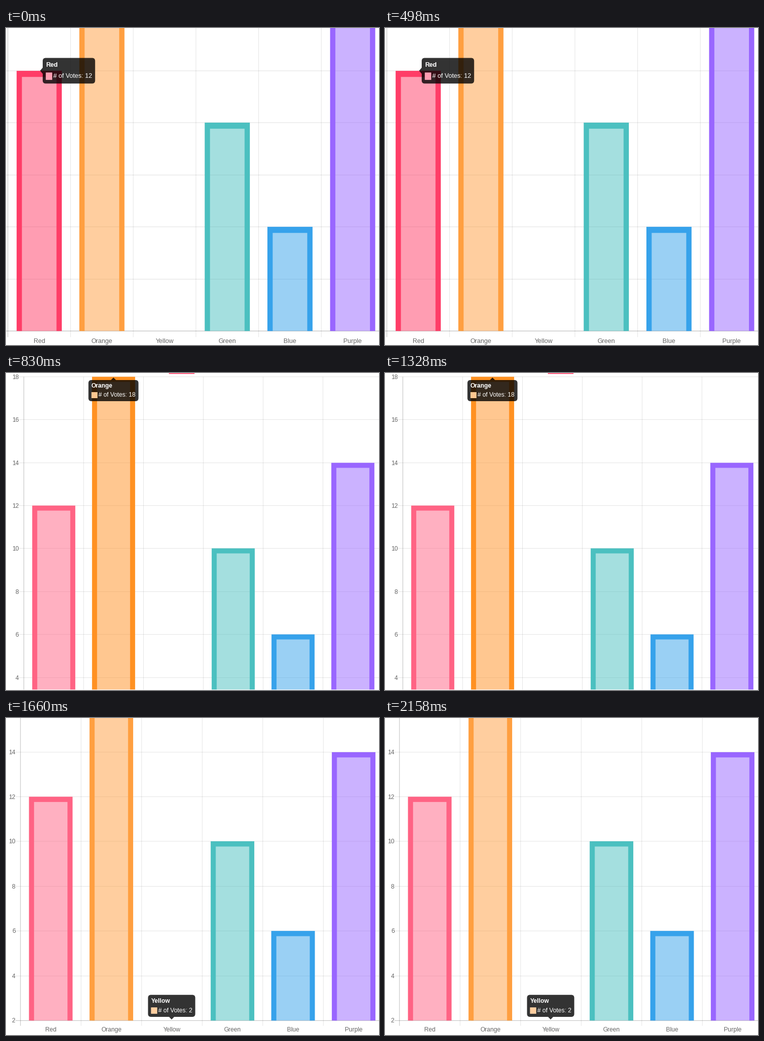
A matplotlib script for the animation above (2.49 s loop, 742 by 630 pixels).

```python
from collections import namedtuple

import matplotlib.pyplot as plt
from matplotlib.animation import FuncAnimation
from matplotlib.patches import FancyBboxPatch, Polygon, Rectangle

W, H, DPI = 742, 630, 100
PX = 72 / DPI
FONT = "Liberation Sans"
LOW, HIGH = 2, 18
COL, STEP = 119, 85.4  # column width and height of two votes, unzoomed

# name, votes, colour, hover colour
BARS = [
    ("Red", 12, "#ff6384", "#ff3d67"),
    ("Orange", 18, "#ff9f40", "#ff9122"),
    ("Yellow", 2, "#ffce56", "#ff9f40"),
    ("Green", 10, "#4bc0c0", "#4bc0c0"),
    ("Blue", 6, "#36a2eb", "#36a2eb"),
    ("Purple", 14, "#9966ff", "#9966ff"),
]

# left axis, y of the lowest value, zoom in x and y,
# lowest visible pixel, hovered bar, tooltip corner, tooltip caret side
View = namedtuple("View", "left base sx sy floor hover tip side")
VIEWS = [
    View(3.7, 602.2, 1.048, 1.211, H, 0, (73, 59.5), "left"),
    View(35.5, 690.5, 1, 1, 629, 1, (164, 14), "top"),
    View(28.8, 601.3, 1.0126, 1.0418, H, 2, (282.5, 550.2), "bottom"),
]

fig = plt.figure(figsize=(W / DPI, H / DPI), dpi=DPI, facecolor="white")
ax = fig.add_axes([0, 0, 1, 1])


def line(xs, ys, width, strong=False):
    ax.plot(xs, ys, color="black", alpha=0.25 if strong else 0.1,
            lw=width * PX, solid_capstyle="butt", snap=False, zorder=0)


def label(x, mid, s, size, color="#666666", ha="left", weight="normal"):
    """Text whose capitals are centred on the height mid."""
    ax.text(x, mid + 0.36 * size, s, fontsize=size * PX, family=FONT,
            color=color, ha=ha, va="baseline", weight=weight)


def fill(patch):
    patch.set(zorder=1, snap=False, linewidth=0)
    ax.add_patch(patch)


def value_y(v, votes):
    return v.base - round((votes - LOW) / 2 * STEP) * v.sy


def draw_grid(v):
    tick = v.left - 10 * v.sx
    size = 12 * v.sx
    for votes in range(LOW, HIGH + 1, 2):
        y = value_y(v, votes)
        if -10 < y < v.floor:
            line([tick, W], [y, y], v.sy, votes == LOW)
            label(tick, y - 0.3, str(votes), size, ha="right")
    end = min(v.base + 10 * v.sy, v.floor)
    for i, (name, *_) in enumerate(BARS):
        x = v.left + i * COL * v.sx
        line([x, x], [value_y(v, HIGH), end], v.sx, i == 0)
        if v.base < H:
            label(x + COL * v.sx / 2, v.base + 16.2 * v.sy, name, size,
                  ha="center")


def draw_bars(v):
    bx, by = 10 * v.sx, 10 * v.sy
    half = 0.36 * COL * v.sx
    bottom = min(v.base, v.floor)
    for i, (_, votes, color, hover) in enumerate(BARS):
        if votes == LOW:
            continue
        if i == v.hover:
            color = hover
        mid = v.left + (i + 0.5) * COL * v.sx
        l, r, t = mid - half, mid + half, value_y(v, votes)
        fill(Rectangle((l + bx / 2, t + by / 2), r - l - bx,
                       bottom - t - by / 2, fc=color, alpha=0.5))
        fill(Polygon([(l, bottom), (l, t), (r, t), (r, bottom),
                      (r - bx, bottom), (r - bx, t + by),
                      (l + bx, t + by), (l + bx, bottom)], fc=color))


def draw_tooltip(v):
    name, votes, _, color = BARS[v.hover]
    x, y = v.tip
    sx, sy = v.sx, v.sy
    w = (99.5 if votes > 9 else 92.8) * sx
    h = 42 * sy
    fill(FancyBboxPatch((x, y), w, h, fc="black", alpha=0.8,
                        boxstyle="round,pad=0,rounding_size=6"))
    cx, cy, dx, dy = x + w / 2, y + h / 2, 5 * sx, 5 * sy
    caret = {
        "left": [(x, cy - dy), (x - dx, cy), (x, cy + dy)],
        "top": [(cx - dx, y), (cx, y - dy), (cx + dx, y)],
        "bottom": [(cx - dx, y + h), (cx, y + h + dy), (cx + dx, y + h)],
    }[v.side]
    fill(Polygon(caret, fc="black", alpha=0.8))

    swatch = (x + 6 * sx, y + 24 * sy), 12 * sx, 12 * sy
    fill(Rectangle(*swatch, fc="white"))
    fill(Rectangle(*swatch, fc=color, alpha=0.5))
    size = 12 * sx
    label(x + 6 * sx, y + 10.7 * sy, name, size, "white", weight="bold")
    label(x + 20 * sx, y + 29 * sy, f"# of Votes: {votes}", size, "white")


def draw(i):
    v = VIEWS[i]
    ax.clear()
    ax.set_xlim(0, W)
    ax.set_ylim(H, 0)
    ax.axis("off")
    draw_grid(v)
    draw_bars(v)
    if value_y(v, HIGH) > 0:
        # lower edge of the legend box
        fill(Rectangle((324, 0), 51, 2, fc=BARS[0][2]))
    draw_tooltip(v)
    return []


anim = FuncAnimation(fig, draw, frames=len(VIEWS), interval=830,
                     init_func=lambda: [], repeat=True, repeat_delay=0)
plt.show()
```
